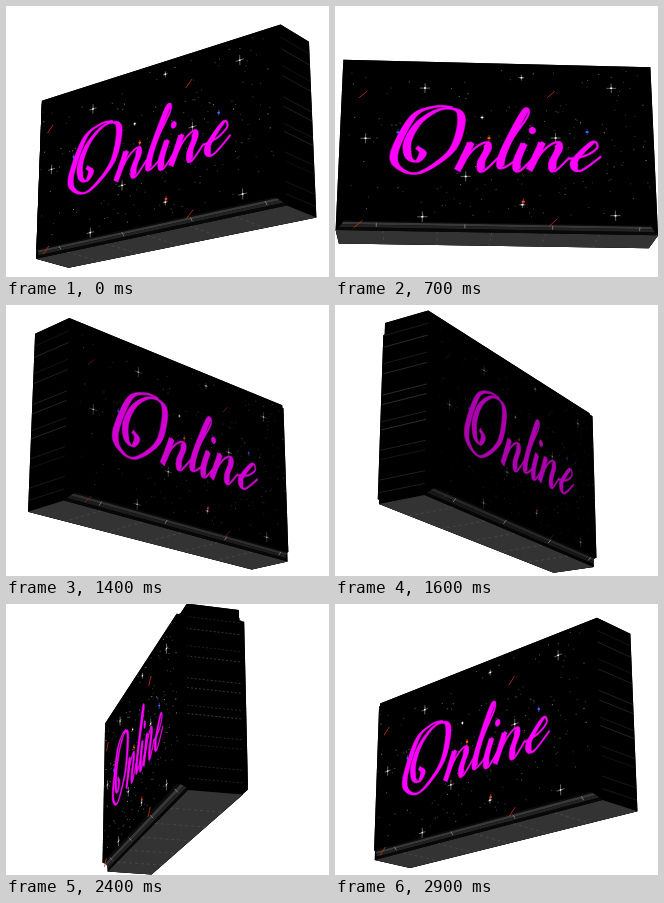
Recreate the animation shown at these times as an HTML page with a canvas. Size 323 by 271 pixels, loop 3000 ms.

```html
<!DOCTYPE html>
<html lang="en">
<head>
<meta charset="utf-8">
<title>Online</title>
<style>
html, body { margin: 0; width: 100%; height: 100%; overflow: hidden; background: #fff; }
canvas { display: block; width: 323px; height: 271px; }
</style>
</head>
<body>
<canvas id="stage" width="323" height="271" role="img" aria-label="Online"></canvas>
<script>
const ctx = document.getElementById('stage').getContext('2d');
const STEP = 100, STEPS = 30, START = -38.5;
const CX = 161.5, CY = 148.3, DIST = 1200;
const W = 154.5, H = 88, T = 32.2, N = 7.5;   // half sizes and cove radius
const PITCH = 0.334, SIN = Math.sin(PITCH), COS = Math.cos(PITCH);
let sinA = 0, cosA = 1;

// Box space to stage: turn about the vertical axis, pitch, perspective.
function project(x, y, z) {
  const X = x * cosA + z * sinA, Z = z * cosA - x * sinA;
  const s = DIST / (DIST - Z * COS + y * SIN);
  return [CX + s * X, CY - s * (y * COS + Z * SIN)];
}

// Front face artwork, laid out in near-frontal stage pixels.
const face = (x, y) =>
  project((x - 163.5) / 1.026, (137.4 - y) / 0.97 + 0.023 * (x - 163.5), T);

function trace(pts) {
  ctx.beginPath();
  pts.forEach(p => ctx.lineTo(p[0], p[1]));
}
function fill(pts, color) {
  trace(pts);
  ctx.closePath();
  ctx.fillStyle = color;
  ctx.fill();
}
function line(a, b, color, width = 1) {
  trace([a, b]);
  ctx.strokeStyle = color;
  ctx.lineWidth = width;
  ctx.stroke();
}
const gray = v => `rgb(${v},${v},${v})`;

let seed = 11;
const rnd = () => (seed = seed * 16807 % 2147483647) / 2147483647;

// The cove runs from the raised front panel back to the wider core.
const cove = [0, 1, 2, 3, 4].map(k => {
  const a = k * Math.PI / 8;
  return { inset: N * Math.cos(a), z: T - N * Math.sin(a) };
});

const mix = (a, b, c, d, t) => 0.5 * (2 * b + (c - a) * t +
  (2 * a - 5 * b + 4 * c - d) * t * t + (3 * b - a - 3 * c + d) * t ** 3);

// Outline of a pen stroke: thick on downstrokes, or on all steep parts.
function pen(pts, steep) {
  const at = i => pts[Math.min(pts.length - 1, Math.max(0, i))];
  const mid = [];
  for (let i = 0; i < (pts.length - 1) * 9; i++) {
    const k = Math.floor(i / 9), t = i % 9 / 9;
    mid.push([0, 1].map(c => mix(at(k - 1)[c], at(k)[c], at(k + 1)[c], at(k + 2)[c], t)));
  }
  const left = [], right = [];
  mid.forEach(([x, y], i) => {
    const p = mid[Math.max(0, i - 2)], q = mid[Math.min(mid.length - 1, i + 2)];
    const dx = q[0] - p[0], dy = q[1] - p[1], len = Math.hypot(dx, dy) || 1;
    const press = steep ? Math.abs(dy / len) : Math.max(0, dy / len);
    const r = 0.9 + 3 * press ** 2;
    left.push([x - dy / len * r, y + dx / len * r]);
    right.unshift([x + dy / len * r, y - dx / len * r]);
  });
  return left.concat(right);
}

const bigO = [
  [82, 141], [88, 147], [82, 155], [74, 150], [73, 135], [84, 116], [104, 103],
  [122, 104], [126, 118], [116, 145], [86, 166], [66, 162], [60, 146], [78, 110], [100, 100], [118, 101]
];
// Small letters: key points on a 166 baseline.
const stem = [[134, 152], [142, 140], [136, 153], [129, 166]];
const arch = [[131, 162], [145, 146], [156, 140], [158, 146], [152, 158], [154, 166], [169, 153]];
const ell = [[168, 155], [185, 132], [197, 115], [194, 111], [174, 147], [171, 163], [184, 157]];
const eye = [[184, 157], [193, 141], [186, 157], [188, 166], [203, 153]];
const end = [[236, 155], [252, 152], [263, 145], [259, 140], [241, 157], [246, 166], [268, 152]];
const dot = Array.from({ length: 12 }, (_, i) =>
  [201 + 3.2 * Math.cos(i * Math.PI / 6), 129 + 3.2 * Math.sin(i * Math.PI / 6)]);
const shift = pts => pts.map(([x, y]) => [x + 68, y]);
const grow = pts => pts.map(([x, y]) => [268 - (268 - x) * 1.05, 165 - (166 - y) * 1.1]);
const word = [stem, arch, ell, eye, shift(stem), shift(arch), end].map(s => pen(grow(s)));
word.push(pen(bigO, true), grow(dot));

const dust = Array.from({ length: 170 }, () =>
  [14 + 300 * rnd(), 62 + 148 * rnd(), 0.2 + 0.45 * rnd() * rnd()]);
const grain = Array.from({ length: 12 }, (_, i) =>
  ({ y: H * (0.9 - 0.158 * (i + 0.6 * rnd())), tone: 0.4 + 0.6 * rnd() }));

// One sky tile, repeated across the face.
const star = r => (x, y) => {
  line(face(x - r, y), face(x + r, y), '#aaa', 0.6);
  line(face(x, y - r), face(x, y + r), '#aaa', 0.6);
  line(face(x - 1, y), face(x + 1, y), '#fff', 1.5);
};
const ember = color => (x, y) => {
  line(face(x - 1.5, y), face(x + 1.5, y), color, 1.8);
  line(face(x, y - 3), face(x, y + 3), color, 0.6);
};
const streak = (x, y) => line(face(x - 4, y + 4), face(x + 4, y - 3), '#c31', 0.8);
const tile = [
  [27, 87, streak], [89, 81, star(5)], [31, 132, star(5)], [131, 170, star(5)],
  [187, 70, star(3)], [147, 111, star(2)], [63, 126, ember('#46f')],
  [154, 132, ember('#f60')], [188, 195, ember('#f42')]
];

function box(w, h, t) {
  const ring = [[w, t], [-w, t], [-w, -t], [w, -t]];
  const top = ring.map(([x, z]) => project(x, h, z));
  const base = ring.map(([x, z]) => project(x, -h, z));
  [top, base, ...top.map((p, i) => [p, top[(i + 1) % 4], base[(i + 1) % 4], base[i]])]
    .forEach(f => fill(f, '#000'));
}

function drawBase() {
  const t = T - N;
  fill([project(-W, -H, t), project(W, -H, t), project(W, -H, -t), project(-W, -H, -t)], '#333');
  ctx.setLineDash([3, 3]);
  for (let x = -110; x < 150; x += 52)
    line(project(x, -H, t), project(x, -H, -t), '#555', 0.6);
  ctx.setLineDash([]);
}

function drawSide() {
  if (Math.abs(sinA) * DIST * COS < W) return;
  const x = sinA > 0 ? -W : W;
  const glow = 35 + 65 * Math.abs(sinA) ** 3;
  ctx.setLineDash(Math.abs(sinA) > 0.9 ? [2, 2] : []);
  grain.forEach(({ y, tone }) =>
    line(project(x, y, N - T), project(x, y, T - N), gray(Math.round(glow * tone)), 0.7));
  ctx.setLineDash([]);
}

function drawCove(light) {
  [12, 56, 34, 8].forEach((v, i) => {
    const a = cove[i], b = cove[i + 1];
    fill([project(a.inset - W, a.inset - H, a.z), project(W - a.inset, a.inset - H, a.z),
      project(W - b.inset, b.inset - H, b.z), project(b.inset - W, b.inset - H, b.z)],
      gray(Math.round(v * light)));
  });
  for (let x = -116; x < 140; x += 84)
    line(project(x, 6 - H, T - 1), project(x, 3 - H, T - 4), '#888', 0.8);
}

function drawSky(light) {
  ctx.globalAlpha = light ** 3;
  dust.forEach(([x, y, a]) => {
    const [px, py] = face(x, y);
    ctx.fillStyle = `rgba(255,255,255,${a})`;
    ctx.fillRect(px, py, 1, 1);
  });
  for (const dx of [0, 190])
    for (const dy of [0, 128])
      tile.forEach(([x, y, mark]) => {
        if (x + dx < 310 && y + dy < 216) mark(x + dx, y + dy);
      });
  ctx.globalAlpha = 1;
}

function drawWord(light) {
  const c = Math.round(255 * light), color = `rgb(${c},0,${c})`;
  word.forEach(shape => {
    fill(shape.map(p => face(...p)), color);
    ctx.strokeStyle = color;
    ctx.lineWidth = 0.5;
    ctx.stroke();
  });
}

function draw(step) {
  let angle = START + step * 180 / STEPS;
  if (angle > 90) angle -= 180;
  sinA = Math.sin(angle * Math.PI / 180);
  cosA = Math.cos(angle * Math.PI / 180);
  const light = Math.min(1, 1 - (angle - 30) * 0.0118);
  ctx.clearRect(0, 0, 323, 271);
  cove.forEach(c => box(W - c.inset, H - c.inset, c.z));
  drawBase();
  drawSide();
  drawCove(light);
  drawSky(light);
  drawWord(light);
}

function tick() {
  draw(Math.floor(performance.now() / STEP) % STEPS);
  requestAnimationFrame(tick);
}
tick();
</script>
</body>
</html>
```
